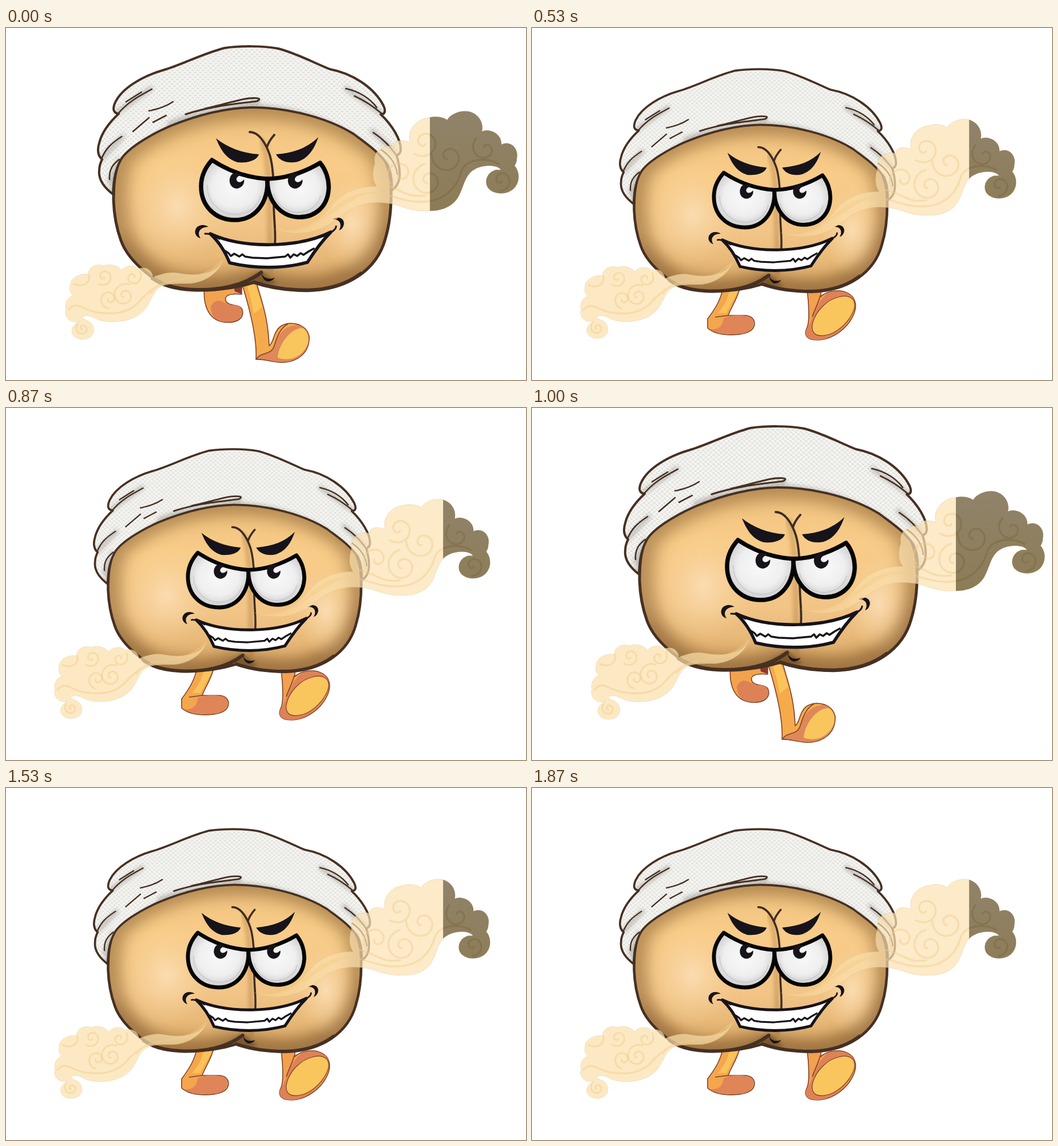
An HTML page for the animation above (1990 ms loop, 909 by 616 pixels).

```html
<!DOCTYPE html>
<html lang="en">
<head>
<meta charset="utf-8">
<title>Walking cartoon</title>
<style>
html, body { margin: 0; width: 100%; height: 100%; overflow: hidden; background: #fff; }
svg { display: block; width: 100%; height: 100%; }
.line { fill: none; stroke-linecap: round; stroke-linejoin: round; }
.ink { stroke: #17131a; }
.brown { stroke: #463022; }
.leg { stroke: #7d4128; stroke-width: 1.6; stroke-linejoin: round; }
.curl { fill: none; stroke: #f0cb88; stroke-width: 3.4; stroke-opacity: .45; stroke-linecap: round; }
.dark .curl { stroke: #7f693f; stroke-opacity: .5; }
</style>
</head>
<body>
<svg viewBox="0 0 909 616" preserveAspectRatio="none">
<defs>
  <path id="skin" d="M200 225C189 255 188 275 188 302C189 330 193 350 201 372C208 392 225 412 246 429C264 445 290 456 327 458C370 460 405 454 434 445C460 453 492 459 527 459C560 459 592 450 616 434C641 417 656 395 663 369C671 343 674 310 673 278C672 255 667 238 655 217C600 160 520 135 430 136C330 138 245 175 200 225Z"/>
  <path id="cap" d="M187 291C174 281 161 266 163 249C163 242 165 236 168 230C161 224 159 214 163 201C168 181 182 164 197 150C187 149 186 141 191 130C203 105 239 84 274 74C306 65 343 45 382 35C410 31 449 31 476 36C510 45 538 61 566 72C604 79 643 103 660 136C664 145 663 151 655 151C674 169 691 195 690 214C689 220 687 221 683 223C689 244 693 273 674 284C675 266 673 252 667 239C650 215 628 201 607 185C560 156 490 139 430 139C376 140 325 156 286 172C245 190 211 213 201 230C190 250 188 268 187 291Z"/>
  <path id="puffL" d="M381 404C367 434 328 434 302 429C286 426 273 430 257 436C255 424 246 417 232 421C222 412 207 417 202 424C195 415 182 412 170 416C157 411 143 420 144 431C128 429 111 438 112 453C110 459 113 464 117 468C106 473 102 484 105 492C101 502 108 513 119 514C122 515 125 514 128 514C117 519 112 528 117 537C123 546 138 547 147 541C156 535 155 521 147 515C143 511 136 511 133 506C139 502 147 503 154 507C172 518 209 516 229 504C253 490 251 470 266 456C279 445 303 448 324 447C353 443 373 426 381 404Z"/>
  <path id="puffR" d="M470 352C510 360 541 344 565 316C588 286 614 277 648 277C639 266 641 246 645 237C640 216 660 202 678 208C678 194 695 196 706 200C700 177 719 159 738 157C752 153 765 156 771 161C779 148 802 141 817 149C829 155 835 169 832 181C847 175 867 186 866 204C881 196 897 210 893 228C893 234 891 238 889 241C897 249 899 266 891 277C882 291 859 293 847 284C834 275 839 255 852 250C857 247 861 249 865 248C857 238 832 240 820 247C802 256 801 277 791 295C781 313 760 321 738 320C707 322 693 311 670 307C631 301 604 312 577 335C546 361 503 365 470 352Z"/>
  <path id="eyeL" d="M360 231C387 249 418 262 457 264C459 304 437 336 400 336C365 336 341 311 341 277C341 256 351 241 360 231Z"/>
  <path id="eyeR" d="M457 264C492 263 524 251 549 236C559 248 565 265 564 282C562 313 540 331 513 331C481 331 456 303 457 264Z"/>
  <clipPath id="inSkin"><use href="#skin"/></clipPath>
  <clipPath id="inCap"><use href="#cap"/></clipPath>
  <clipPath id="inDark"><rect id="shade" y="100" width="300" height="300"/></clipPath>
  <filter id="soft" x="-30%" y="-30%" width="160%" height="160%"><feGaussianBlur stdDeviation="14"/></filter>
  <filter id="fine" x="-30%" y="-30%" width="160%" height="160%"><feGaussianBlur stdDeviation="3.5"/></filter>
  <linearGradient id="tan" x1="0" y1="0" x2="0" y2="1">
    <stop offset="0" stop-color="#efc27f"/><stop offset=".3" stop-color="#f8cc88"/>
    <stop offset=".65" stop-color="#f2c587"/><stop offset="1" stop-color="#dcab69"/>
  </linearGradient>
  <radialGradient id="glow">
    <stop offset="0" stop-color="#fde3bf" stop-opacity=".75"/><stop offset="1" stop-color="#f9d49c" stop-opacity="0"/>
  </radialGradient>
  <radialGradient id="ball" cx=".5" cy=".45" r=".56">
    <stop offset="0" stop-color="#f9f9f9"/><stop offset=".6" stop-color="#efefef"/><stop offset="1" stop-color="#cacacb"/>
  </radialGradient>
  <linearGradient id="soot" x1="0" y1="0" x2="0" y2="1">
    <stop offset="0" stop-color="#90836a"/><stop offset="1" stop-color="#8c7a52"/>
  </linearGradient>
  <linearGradient id="wisp" gradientUnits="userSpaceOnUse" x1="470" y1="0" x2="680" y2="0">
    <stop offset="0" stop-color="#fbdb9f" stop-opacity=".4"/><stop offset="1" stop-color="#fbe2b3" stop-opacity=".72"/>
  </linearGradient>
  <pattern id="knit" width="9" height="8" patternUnits="userSpaceOnUse">
    <rect width="9" height="8" fill="#f3f3f0"/>
    <path d="M1 1.2L3.8 3M5.5 7L8.3 5.2" stroke="#dad9d4" stroke-width="1.6" stroke-linecap="round"/>
  </pattern>
</defs>

<g id="stride">
  <g class="leg">
    <path d="M347 453C344 482 352 512 383 515C405 517 417 507 413 493C409 482 391 488 385 479C380 469 389 464 412 466L412 445Z" fill="#f2a34d"/>
    <path d="M358 487C370 467 382 484 393 485C406 484 414 488 413 500C410 514 385 518 370 511C362 507 358 496 358 487Z" fill="#dd8257" stroke="none"/>
    <path d="M398 451L413 449L411 465L400 461Z" fill="#8c3829" stroke="none"/>
    <path d="M410 440L437 442C444 471 458 501 460 556C469 550 466 533 480 522C498 511 525 518 530 540C531 570 507 587 477 585C462 584 450 579 437 580C439 545 427 493 410 440Z" fill="#f5aa4c"/>
    <path d="M438 579C448 567 464 571 470 556C475 533 491 519 512 520C526 524 532 540 528 554C519 578 497 586 474 584C461 583 450 578 438 579Z" fill="#df8858" stroke="none"/>
    <path d="M475 577C476 556 495 527 517 525C528 528 532 544 526 556C518 574 497 585 475 577Z" fill="#f9c55d" stroke="none"/>
    <path d="M420 449C426 464 430 482 433 500L448 488C443 472 439 459 435 449Z" fill="#fac45a" stroke="none"/>
    <path d="M438 579C446 566 463 574 469 556C474 539 480 524 493 518" fill="none"/>
  </g>
</g>

<g id="stand">
  <g class="leg">
    <path d="M334 453L364 453C359 474 349 487 343 503L374 503C389 505 392 517 386 526C378 537 351 538 333 536C320 534 311 529 307 525L307 509C319 493 331 475 334 453Z" fill="#f4a64d"/>
    <path d="M335 508C350 500 379 502 385 509C392 520 382 533 366 535C345 537 322 535 311 527C323 528 333 525 335 508Z" fill="#df8558" stroke="none"/>
    <path d="M345 459L361 459C354 474 346 486 340 499L325 499C338 484 343 472 345 459Z" fill="#fac25a" stroke="none"/>
    <path d="M320 506L343 503" fill="none"/>
    <path d="M480 452L505 455L505 470C516 459 539 457 552 464C566 471 569 486 562 502C552 525 526 546 498 546C480 546 475 537 480 526C486 516 484 480 480 452Z" fill="#f3a04f"/>
    <path d="M480 527C492 509 499 475 517 464C536 456 564 462 565 484C560 515 531 544 501 546C483 547 474 538 480 527Z" fill="#de8256" stroke="none"/>
    <path d="M490 520C493 500 512 477 535 471C555 465 568 475 563 492C557 511 538 530 520 536C500 542 488 537 490 520Z" fill="#f9c55d" stroke-width="1.2"/>
    <path d="M504 468C501 481 494 493 490 505" fill="none"/>
  </g>
</g>

<g id="body">
  <use href="#skin" fill="url(#tan)"/>
  <g clip-path="url(#inSkin)">
    <use href="#skin" class="line" stroke="#7a5226" stroke-width="48" opacity=".5" filter="url(#soft)"/>
    <path class="line" d="M201 380C240 450 360 475 443 435C510 475 640 450 668 350" stroke="#6a4420" stroke-width="16" opacity=".4" filter="url(#soft)"/>
    <ellipse cx="300" cy="312" rx="85" ry="100" fill="url(#glow)"/>
    <ellipse cx="606" cy="342" rx="58" ry="90" fill="url(#glow)"/>
    <path class="line" d="M448 198C463 230 460 320 463 425" stroke="#a06a2d" stroke-width="10" opacity=".35" filter="url(#fine)"/>
    <path d="M410 448L446 424L474 448L440 454Z" fill="#60401f" opacity=".6" filter="url(#fine)"/>
  </g>
  <use href="#skin" class="line brown" stroke-width="5"/>
  <path class="line brown" d="M256 438C275 452 300 457 327 458C370 460 415 452 446 428M434 445C460 454 492 459 527 459C565 458 595 449 620 430" stroke-width="6.5"/>

  <use href="#cap" fill="url(#knit)"/>
  <g clip-path="url(#inCap)" class="line" stroke="#77736b" opacity=".38" filter="url(#fine)">
    <path d="M187 291C185 225 300 143 430 139C550 141 670 210 674 284" stroke-width="11"/>
    <path d="M191 150L253 106M168 228L204 190M286 167C340 145 390 142 440 130M595 106L657 150M640 180L684 222M181 270L197 231" stroke-width="8"/>
  </g>
  <use href="#cap" class="line brown" stroke-width="4"/>
  <g class="line brown" stroke-width="2.6">
    <path d="M195 151C212 130 231 120 255 107M210 129L237 112M167 229C174 211 184 202 202 190M222 181L250 157M257 165L280 153M250 145C266 142 280 137 292 129M181 265C180 248 186 239 198 230"/>
    <path d="M314 151C356 137 400 133 439 128C451 122 432 121 413 125C390 130 368 137 348 141" stroke-width="3.2"/>
    <path d="M657 150C642 137 629 128 609 119M594 106C618 111 637 124 648 139M682 222C670 206 660 195 642 183M656 213C672 224 682 239 684 256"/>
  </g>

  <path class="line" d="M426 182C441 182 453 199 461 222C467 242 468 268 468 305C468 335 472 356 470 379M469 187C462 195 458 202 456 209" stroke="#3d2c22" stroke-width="3.8"/>
  <path d="M367 193C387 209 412 219 442 221C439 232 421 237 405 235C384 229 375 212 367 193ZM546 191C528 209 503 219 472 221C478 233 494 238 510 234C531 227 540 208 546 191Z" fill="#17131a"/>
  <g stroke="#050505" stroke-width="7.5" stroke-linejoin="round" fill="url(#ball)">
    <use href="#eyeL"/><use href="#eyeR"/>
  </g>
  <path class="line" d="M352 276C352 305 374 326 402 326C424 325 439 314 445 294M468 290C473 309 489 322 510 323C531 321 545 312 550 294" stroke="#b9b9bd" stroke-width="2" opacity=".5"/>
  <g id="pupil">
    <path d="M394 257C399 252 407 253 412 257C404 259 401 264 404 268C407 271 412 270 416 265C418 273 411 281 403 281C392 280 387 267 394 257Z" fill="#17131a"/>
  </g>
  <use href="#pupil" x="102"/>
  <path class="ink" d="M357 360C415 387 512 385 568 357C551 374 539 391 527 410C483 422 433 421 391 411C383 392 374 376 357 360Z" fill="#fff" stroke-width="5.5" stroke-linejoin="round"/>
  <path class="line ink" d="M378 387L389 394L393 399L399 395L408 400L413 396L418 400L431 402L456 403L488 400L493 396L497 402L503 396L509 399L515 394L520 397L529 391L538 386" stroke-width="3.5"/>
  <path class="line ink" d="M348 360C358 359 365 364 373 369M559 361C570 358 577 352 577 347" stroke-width="3"/>
  <path d="M354 348C342 340 328 348 331 360C333 365 336 367 340 368C333 358 339 348 354 348ZM571 335C582 327 594 335 590 346C588 351 586 353 582 354C588 344 584 334 571 335ZM447 429C450 438 459 441 470 437C460 449 448 443 447 429Z" fill="#17131a"/>
</g>

<g id="smokeL">
  <use href="#puffL" fill="#fbe0ac" fill-opacity=".7" stroke="#d9b374" stroke-width=".7" stroke-opacity=".45"/>
  <g id="curlsL">
    <path class="curl" d="M253 463C276 429 340 452 378 407M230 482C252 456 275 440 310 441M109 493C126 475 132 495 163 498C196 503 222 496 239 471M145 432C148 446 135 455 119 448"/>
  </g>
</g>
<g id="smokeR">
  <use href="#puffR" fill="url(#wisp)" stroke="#d9b374" stroke-width=".7" stroke-opacity=".45"/>
  <g id="curlsR">
    <path class="curl" d="M480 353C555 370 570 282 647 289C674 291 694 305 727 304C765 304 789 280 796 250C805 229 839 225 861 238M493 356C546 350 573 313 621 292M658 274C691 280 696 298 733 293"/>
  </g>
  <g class="dark" id="shadow" clip-path="url(#inDark)">
    <use href="#puffR" fill="url(#soot)"/>
  </g>
</g>
</svg>
<script>
const $ = id => document.getElementById(id);
const svgNS = "http://www.w3.org/2000/svg";

// Spiral from the centre out: x, y, radius, turns, start angle, direction
function curl(x, y, r, turns, start, dir) {
  let d = "";
  for (let i = 0; i <= 32; i++) {
    const k = i / 32, a = start + dir * turns * 2 * Math.PI * k, q = r * (.15 + .85 * k);
    d += (i ? "L" : "M") + (x + q * Math.cos(a)).toFixed(1) + " " + (y + q * Math.sin(a)).toFixed(1);
  }
  const p = document.createElementNS(svgNS, "path");
  p.setAttribute("class", "curl");
  p.setAttribute("d", d);
  return p;
}

[[171, 435, 16, 1.2, 1, 1], [207, 468, 21, 1.5, 2, 1], [222, 436, 15, 1.1, 0, -1],
 [181, 474, 17, 1.2, 3, -1], [134, 526, 12, 1.3, 2, 1]
].forEach(c => $("curlsL").append(curl(...c)));

[[731, 200, 26, 1.2, 1, 1], [738, 267, 30, 1.4, 2, 1], [690, 255, 25, 1.1, 3, -1],
 [773, 225, 29, 1.2, 2, 1], [838, 211, 24, 1, 4, 1], [865, 266, 19, 1.1, 1, 1]
].forEach(c => $("curlsR").append(curl(...c)));
$("shadow").append($("curlsR").cloneNode(true));
$("shadow").lastChild.removeAttribute("id");

const poses = [
  { body: "", left: "", right: "", shade: 741 },
  { body: "matrix(.912 0 0 .9115 7 42.7)", left: "matrix(.965 0 0 .965 -15.4 17.5)",
    right: "matrix(.965 0 0 .963 -18.5 19.4)", shade: 811 }
];
const turns = [200, 330, 530, 670, 870, 1000, 1200, 1330, 1530, 1670, 1870];
const loop = 1990;
let shown = -1;

function draw(now) {
  const t = now % loop, n = turns.filter(x => t >= x).length % 2;
  if (n !== shown) {
    const p = poses[shown = n];
    $("body").setAttribute("transform", p.body);
    $("smokeL").setAttribute("transform", p.left);
    $("smokeR").setAttribute("transform", p.right);
    $("shade").setAttribute("x", p.shade);
    $("stride").style.display = n ? "none" : "";
    $("stand").style.display = n ? "" : "none";
  }
}

const begin = performance.now();
function tick() {
  draw(performance.now() - begin);
  requestAnimationFrame(tick);
}
tick();
</script>
</body>
</html>
```
